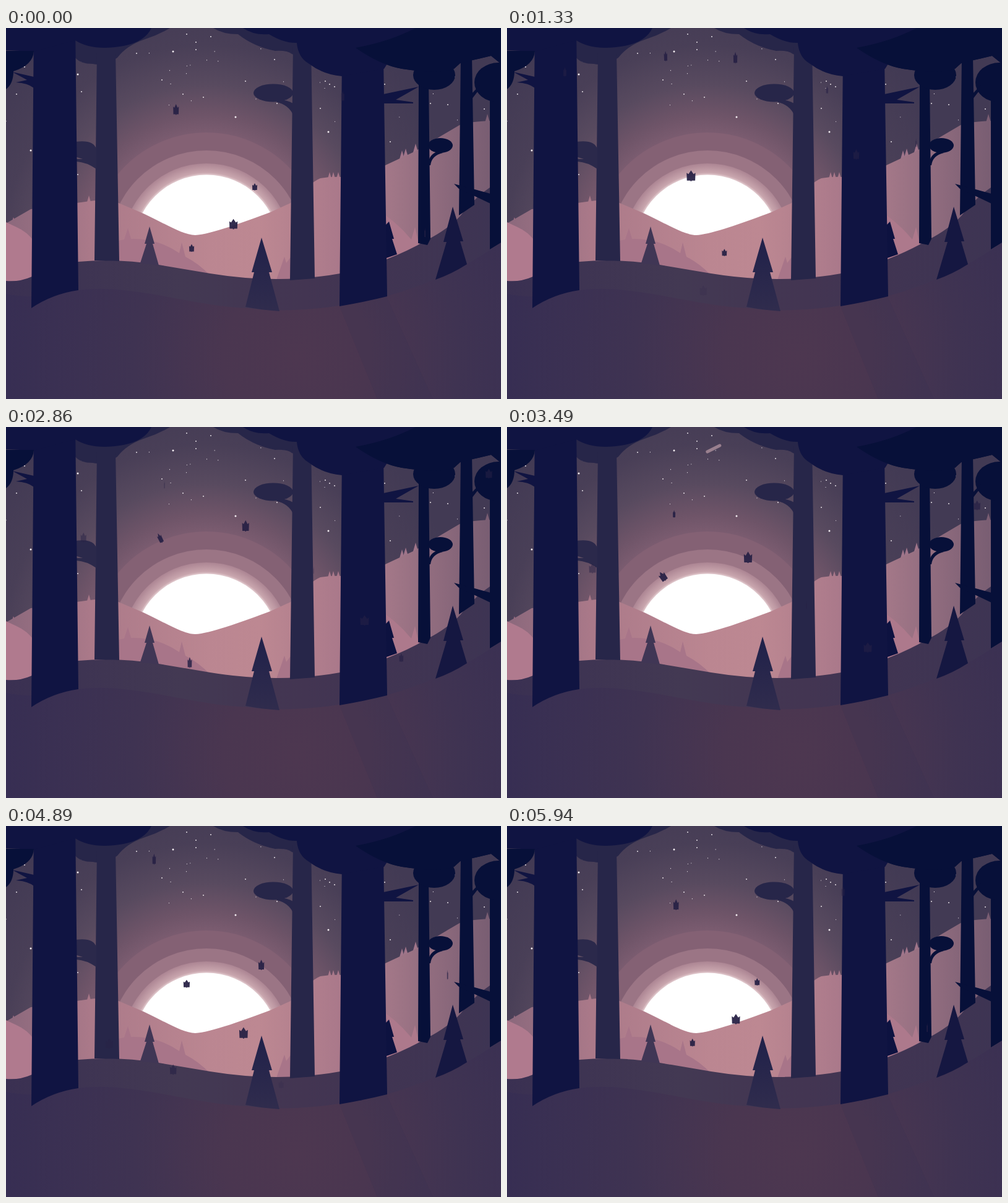
Write an HTML page that moves like this. It is 800 by 600 pixels and loops after 6.01 s.

```html
<!DOCTYPE html>
<html lang="en">
<head>
<meta charset="utf-8">
<title>Forest dusk</title>
<style>
  html, body { margin: 0; width: 100%; height: 100%; overflow: hidden; background: #443b54; }
  svg { display: block; width: 800px; height: 600px; }
</style>
</head>
<body>
<svg viewBox="0 0 800 600">
  <defs>
    <radialGradient id="sky" gradientUnits="userSpaceOnUse" cx="324" cy="355" r="420">
      <stop offset=".44" stop-color="#7b5c70"/><stop offset=".51" stop-color="#6e5468"/>
      <stop offset=".63" stop-color="#584a5f"/><stop offset=".78" stop-color="#493f57"/>
      <stop offset="1" stop-color="#423a54"/>
    </radialGradient>
    <radialGradient id="halo" gradientUnits="userSpaceOnUse" cx="324" cy="355" r="136">
      <stop offset=".85" stop-color="#f0dfe1"/><stop offset=".89" stop-color="#c9a6ae"/>
      <stop offset="1" stop-color="#ac8593"/>
    </radialGradient>
    <linearGradient id="valley" gradientUnits="userSpaceOnUse" x1="0" x2="545">
      <stop stop-color="#8b687c"/><stop offset=".25" stop-color="#aa7989"/>
      <stop offset=".6" stop-color="#bb8691"/><stop offset=".75" stop-color="#bd8892"/>
      <stop offset="1" stop-color="#a9788a"/>
    </linearGradient>
    <linearGradient id="ridge" gradientUnits="userSpaceOnUse" x1="600" x2="785">
      <stop stop-color="#a77a8a"/><stop offset="1" stop-color="#785d72"/>
    </linearGradient>
    <linearGradient id="mid" gradientUnits="userSpaceOnUse" x1="0" x2="800">
      <stop stop-color="#3a3052"/><stop offset=".35" stop-color="#433953"/>
      <stop offset=".6" stop-color="#433552"/><stop offset="1" stop-color="#3d3453"/>
    </linearGradient>
    <radialGradient id="front" gradientUnits="userSpaceOnUse" cx="470" cy="530" r="480">
      <stop stop-color="#4d3750"/><stop offset=".25" stop-color="#4a3650"/>
      <stop offset=".55" stop-color="#3f3352"/><stop offset="1" stop-color="#372e53"/>
    </radialGradient>
    <linearGradient id="fir" x2="0" y2="1">
      <stop stop-color="#20214a"/><stop offset="1" stop-color="#302c4d"/>
    </linearGradient>
  </defs>

  <rect width="800" height="600" fill="url(#sky)"/>
  <g id="stars" fill="#f4eef2"></g>
  <circle cx="324" cy="355" r="186" fill="#846174"/>
  <circle cx="324" cy="355" r="157" fill="#9b7585"/>
  <circle cx="324" cy="355" r="136" fill="url(#halo)"/>
  <circle cx="324" cy="355" r="117.5" fill="#fff"/>
  <path id="meteor" d="M-10 5L10-5" stroke="#b495a1" stroke-width="5" stroke-linecap="round"/>

  <!-- hills -->
  <g id="spikes"></g>
  <path fill="url(#valley)" d="M0 316L40 293 143 279 182 283 222 300C255 315 285 335 306 335C330 334 390 312 427 298L460 283C480 262 495 249 508 243Q525 240 545 241V600H0Z"/>
  <path fill="#b07a8e" d="M0 314L17 322Q35 330 45 345V420H0Z"/>
  <path fill="#a87589" d="M182 344L191 342 197 324 202 341Q245 340 280 364L284 347 290 370Q310 380 330 400H182Z"/>
  <path fill="#a87589" d="M436 410L450 370 453 380 462 368V410Z"/>
  <path fill="url(#ridge)" d="M540 262L613 222 660 200 733 157Q752 150 800 150V420H540Z"/>
  <path fill="#ad798c" d="M600 294Q630 312 655 342L661 322 668 352V400H600Z"/>
  <path fill="url(#mid)" d="M0 409Q22 411 42 402Q80 382 117 378Q180 372 247 383L330 397Q440 415 540 397Q620 378 680 343Q715 325 735 303Q760 270 800 246V600H0Z"/>

  <!-- distant trees -->
  <g fill="#272649">
    <path d="M112 0H265Q245 12 225 18Q195 28 180 48Q160 62 140 58Q120 58 112 48Z"/>
    <path d="M335 0Q350 10 375 10Q400 30 435 37Q455 36 462 42L500 55V0Z"/>
    <path d="M147 40H177L183 377 143 376ZM464 30H493L499 405 459 408Z"/>
    <path fill="#2b294b" d="M112 184Q142 180 146 196V228Q130 217 114 216V212H124L112 208Z"/>
    <ellipse cx="432" cy="105" rx="32" ry="14.5"/>
    <path d="M438 116Q455 116 464 122V140Q456 124 438 120Z"/>
  </g>
  <path fill="#403655" d="M232 321L240 349H237L247 384 217 380 227 349H224Z"/>

  <path fill="url(#front)" d="M0 430C50 440 80 428 117 424C200 412 300 450 390 453C450 462 540 453 615 434C690 412 750 383 800 347V600H0Z"/>
  <path fill="#39304f" opacity=".25" d="M539 450L615 434 690 600H600Z"/>
  <path fill="url(#fir)" d="M413 339L430 395H425L442 458Q412 456 387 451L401 395H397Z"/>
  <path fill="#0d1240" d="M619 313L627 341H624L632 366 612 373V320Z"/>
  <path fill="#151741" d="M722 289L739 345H734L745 382Q720 398 694 407L712 346H707Z"/>

  <!-- right-hand trees -->
  <g fill="#071039">
    <path d="M667 85H683L686 341 681 351 666 348ZM735 45H753L757 286 732 303ZM782 90H800V347L782 358Z"/>
    <path id="canopy" d="M565 32Q620 22 662 0H800V58L784 45 754 52 734 57 724 66Q700 75 640 66Q605 60 565 32Z"/>
    <ellipse cx="692" cy="76" rx="34" ry="24"/>
    <ellipse cx="796" cy="88" rx="39" ry="32"/>
    <ellipse cx="702" cy="190" rx="20" ry="12"/>
    <path d="M682 222Q683 203 700 199L706 202Q688 206 686 222ZM752 107L766 92V98L752 116ZM783 284L732 260 724 252 783 268Z"/>
  </g>

  <!-- near trees -->
  <g fill="#101442">
    <path d="M45 0H112L117 424Q75 430 41 453ZM543 50H610L616 434Q580 443 539 450Z"/>
    <path d="M0 0H235Q225 22 190 29Q140 38 112 20L45 38 0 36Z"/>
    <path d="M383 0Q400 12 425 10Q450 25 470 24Q472 48 490 58Q512 75 543 78L611 66 640 20 662 0Z"/>
    <path d="M10 71L45 79V97Q35 89 16 88L34 84ZM610 107L667 95 630 116 658 120V122H610Z"/>
  </g>
  <path fill="#071039" d="M0 37H45Q44 60 12 70Q12 90 0 99Z"/>
  <use href="#canopy" fill="#071039"/>
  <g id="leaves" fill="#282246"></g>
</svg>
<script>
const LOOP = 6010, NS = "http://www.w3.org/2000/svg";
const byId = id => document.getElementById(id);

function add(parent, tag, attrs) {
  const el = document.createElementNS(NS, tag);
  for (const k in attrs) el.setAttribute(k, attrs[k]);
  return parent.appendChild(el);
}

const addStar = (cx, cy, r) => add(byId("stars"), "circle", { cx, cy, r });
[[270, 38], [371, 144], [116, 75], [40, 198], [521, 168]].forEach(([x, y]) => addStar(x, y, 1.5));
[[292, 10], [331, 14], [307, 23], [307, 35], [387, 86], [434, 51], [252, 84], [286, 107],
 [211, 41], [319, 112], [30, 63], [17, 107], [438, 122], [516, 86], [523, 91], [531, 95],
 [508, 130], [612, 91], [621, 184], [686, 122], [714, 124], [773, 131], [122, 103], [116, 237]
].forEach(([x, y]) => addStar(x, y, .9));

let seed = 7;
const random = () => (seed = seed * 16807 % 2147483647) / 2147483647;
for (let i = 0; i < 45; i++) addStar(random() * 800, 8 + random() * 155, .6);

// Tiny firs along the far ridges
function addSpike(x, y, fill) {
  add(byId("spikes"), "path", { d: `M${x} ${y}l4 14h-8z`, fill });
}
addSpike(134, 271, "#a87888");
addSpike(12, 306, "#b07a8e");
[523, 529, 537].forEach(x => addSpike(x, 233, "#a9788a"));
[640, 646, 662].forEach(x => addSpike(x, 518 - x / 2, "#a0758a"));
addSpike(778, 139, "#7a5e73");

// A leaf drifts from one point to another and beyond; bow bends the path,
// flips are its relative widths at even steps between the two points.
const leaves = [];
function addLeaf(size, alpha, lead, from, to, bow, flips, tilt = 0) {
  const el = add(byId("leaves"), "path",
    { d: "M0-9L4-3 7-5 6.5 7.5H1V8.5H-1V7.5H-6.5L-7-5-4-3Z" });
  leaves.push({ el, size, alpha, start: from[0] - lead, from, to, bow, flips, tilt });
}
addLeaf(.95, .95, 140, [770, 264, 3], [4890, 270, 393], [-18, -22], [.7, .15, -.5, -.95, -.8], -35);
addLeaf(1.05, .95, 280, [770, 358, 12], [4890, 384, 334], [16, -16], [.8, .13, .75, 1, .95]);
addLeaf(.72, .95, 420, [1890, 229, 26], [6010, 300, 356], [14, -15], [.75, .03, .7, 1.05, .8]);
addLeaf(1, .95, 770, [4890, 239, 53], [8870, 297, 380], [24, -16], [.4, .6, 1, 1.05, .5]);
addLeaf(.68, .95, 980, [6010, 402, 257], [7900, 330, 408], [0, 0], [.85, .95, 1, .8, .6]);
addLeaf(.95, .95, 700, [4890, 413, 224], [6780, 338, 380], [-1, 1], [.7, .85, 1, 1, .85]);
addLeaf(.95, .5, 420, [5940, 543, 105], [9500, 583, 356], [6, 1], [.4, .35, 1, 1.1, 1]);
addLeaf(.8, .7, 1330, [1890, 653, 254], [2860, 639, 372], [0, 0], [.12, .5, .6], -15);
addLeaf(.9, .5, 490, [770, 82, 37], [3490, 138, 228], [0, -8], [.85, .3, .1, .7, .9]);
addLeaf(.9, .75, 700, [3490, 760, 126], [4890, 714, 240], [0, 0], [.85, .5, .14]);
addLeaf(.7, .6, 980, [1890, 512, 147], [4890, 445, 417], [8, -4], [.35, .05, .1, .5, .8]);

function widthAt(flips, u) {
  const p = Math.min(Math.max(u, 0), 1) * (flips.length - 1);
  const i = Math.min(Math.floor(p), flips.length - 2);
  return flips[i] + (flips[i + 1] - flips[i]) * (p - i);
}

function drawLeaf(leaf, now) {
  const { el, size, alpha, start, from, to, bow, flips, tilt } = leaf;
  const t = now < start ? now + LOOP : now;
  const u = (t - from[0]) / (to[0] - from[0]);
  const [x, y] = [1, 2].map(c => from[c] + (to[c] - from[c]) * u + bow[c - 1] * 4 * u * (1 - u));
  const fade = Math.min(1, (t - start + 60) / 200);
  const ground = Math.min(1, Math.max(0, (435 - y) / 60));
  const turn = u > 0 && u < 1 ? tilt * Math.sin(Math.PI * u * u) : 0;
  el.setAttribute("opacity", alpha * fade * ground);
  el.setAttribute("transform",
    `translate(${x} ${y}) rotate(${turn}) scale(${size * widthAt(flips, u)} ${size})`);
}

function drawMeteor(t) {
  const p = (t - 3490) / 210;
  const el = byId("meteor");
  el.setAttribute("opacity", Math.max(0, .75 * (1 - p * p)));
  el.setAttribute("transform", `translate(${336 - 45 * p} ${34 + 22 * p})`);
}

// The picture advances every 70 ms, with one step 10 ms shorter
function draw(ms) {
  const t = ms % LOOP;
  const step = Math.floor((t + (t >= 2860 ? 10 : 0)) / 70) * 70;
  leaves.forEach(leaf => drawLeaf(leaf, step));
  drawMeteor(step);
}

const begin = performance.now();
function tick() {
  draw(performance.now() - begin);
  requestAnimationFrame(tick);
}
tick();
</script>
</body>
</html>
```
